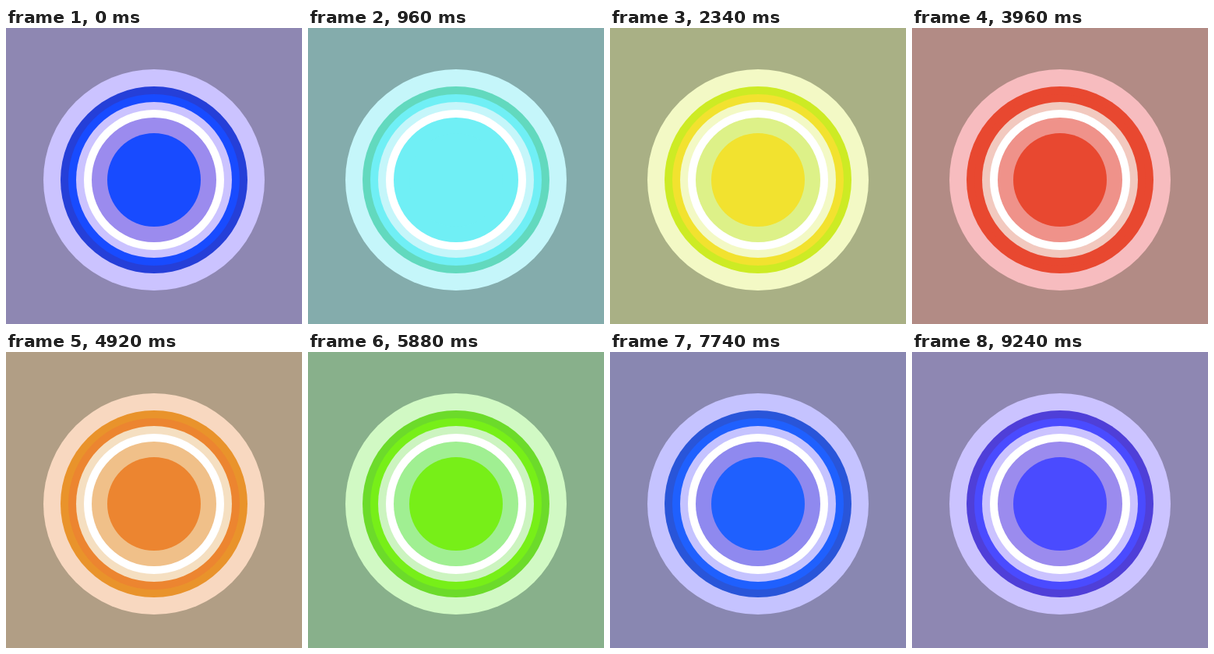
These frames come from a looping animation (380 px wide and 380 px high, 9600 ms). An HTML page:

```html
<!DOCTYPE html>
<html lang="en">
<head>
<meta charset="utf-8">
<title>Colour rings</title>
<style>
  html, body { margin: 0; width: 100%; height: 100%; overflow: hidden; }
  svg { display: block; width: 100vw; height: 100vh; }
</style>
</head>
<body>
<svg id="stage" viewBox="0 0 380 380"></svg>
<script>
const LOOP = 9600, STEP = 60, TURN = 3930;
const CX = 190, CY = 195;

// Positions along the sweep from red (0) to violet (1) for the colour stops.
const STOPS = [0, 0.247, 0.355, 0.683, 0.92, 0.972];

// red, yellow, green, cyan, blue, violet
const PALETTE = {
  back:  ['#b28b85', '#a9b085', '#88b08b', '#84acac', '#8e87b2', '#8e87b2'],
  halo:  ['#f7bcbf', '#f3f9c5', '#d1f9c4', '#c5f6fa', '#cbc3ff', '#cbc3ff'],
  rim:   ['#e84830', '#cdeb24', '#6cdb2a', '#62d9be', '#2540d8', '#4f3fd8'],
  core:  ['#e84830', '#f2e22f', '#77ef18', '#70eff5', '#174bff', '#4a4bff'],
  inset: ['#f2c9bf', '#f3f9c5', '#ccf4c0', '#c5f6fa', '#cbc3ff', '#cbc3ff'],
  band:  ['#ef928a', '#ddf188', '#a0ef92', '#70eff5', '#9b8bee', '#9b8bee']
};

const DISCS = [
  [142, 'halo'], [120, 'rim'], [110, 'core'], [100, 'inset'],
  [90, 'white'], [80, 'band'], [60, 'core']
];

// Stretches where the picture rests: [from, to]
const HOLDS = [[3300, 3960], [3960, 4380], [8700, 9240], [9240, LOOP]];

function toHsl(hex) {
  const [r, g, b] = [1, 3, 5].map(i => parseInt(hex.slice(i, i + 2), 16) / 255);
  const max = Math.max(r, g, b), min = Math.min(r, g, b), d = max - min;
  const l = (max + min) / 2;
  let h = max === r ? (g - b) / d : max === g ? 2 + (b - r) / d : 4 + (r - g) / d;
  return [h * 60, d / (1 - Math.abs(2 * l - 1)) * 100, l * 100];
}

const ramps = Object.fromEntries(
  Object.entries(PALETTE).map(([name, list]) => [name, list.map(toHsl)]));

function add(tag, attrs) {
  const el = document.createElementNS('http://www.w3.org/2000/svg', tag);
  for (const key in attrs) el.setAttribute(key, attrs[key]);
  return document.getElementById('stage').appendChild(el);
}

const parts = [{ el: add('rect', { width: 380, height: 380 }), ramp: ramps.back }];
for (const [r, name] of DISCS) {
  const el = add('circle', { cx: CX, cy: CY, r, fill: '#fff' });
  if (ramps[name]) parts.push({ el, ramp: ramps[name] });
}

function colorAt(ramp, p) {
  let i = 0;
  while (i < STOPS.length - 2 && p > STOPS[i + 1]) i++;
  const k = Math.min(1, (p - STOPS[i]) / (STOPS[i + 1] - STOPS[i]));
  const [h, s, l] = ramp[i].map((v, c) => v + (ramp[i + 1][c] - v) * k);
  return `hsl(${h.toFixed(2)}, ${s.toFixed(2)}%, ${l.toFixed(2)}%)`;
}

function draw(ms) {
  let t = Math.floor((ms % LOOP) / STEP) * STEP;
  const hold = HOLDS.find(([from, to]) => t >= from && t < to);
  if (hold) t = hold[0];
  const p = (1 - Math.cos((t - TURN) / LOOP * 2 * Math.PI)) / 2;
  for (const { el, ramp } of parts) el.setAttribute('fill', colorAt(ramp, p));
}

const start = performance.now();
function tick() {
  draw(performance.now() - start);
  requestAnimationFrame(tick);
}
tick();
</script>
</body>
</html>
```
